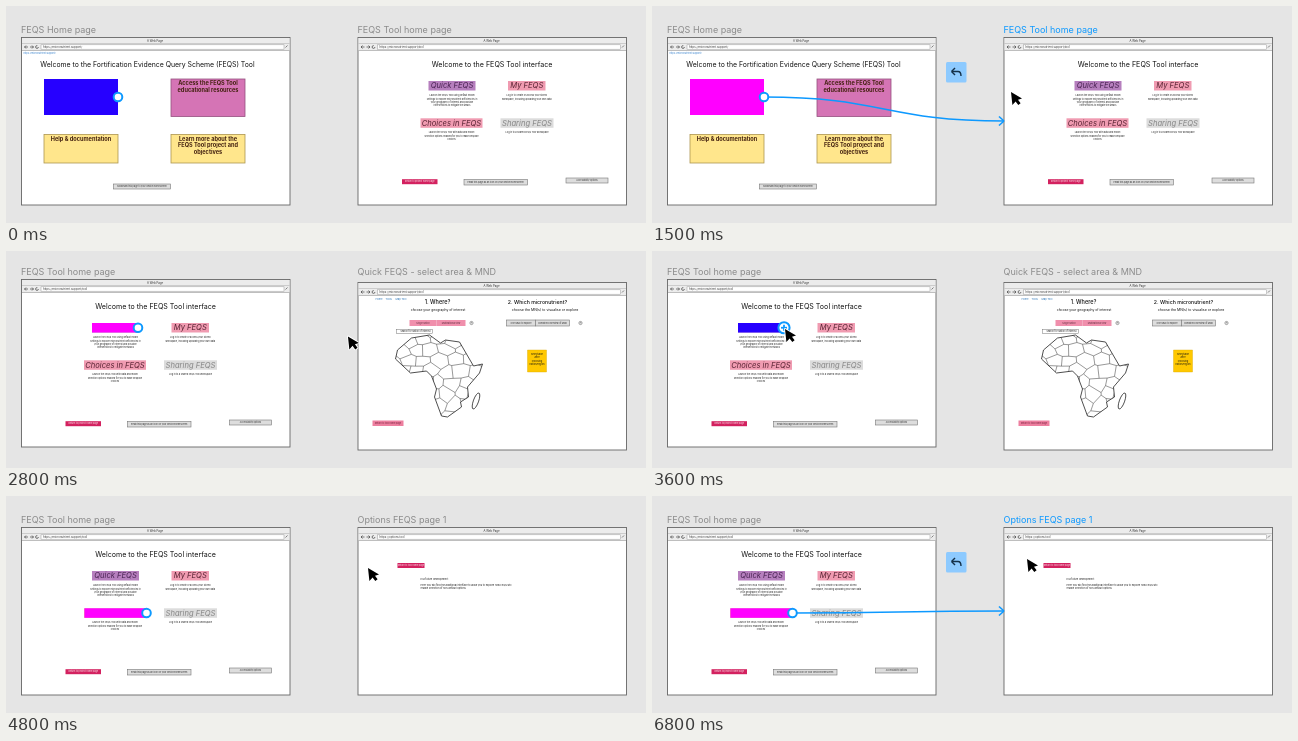
Animation, 640 px wide and 217 px high, one loop 6900 ms. Source, as an HTML page with a canvas:

```html
<!DOCTYPE html>
<html lang="en">
<head>
<meta charset="utf-8">
<title>Prototype linking</title>
<style>
html, body { margin: 0; width: 100%; height: 100%; overflow: hidden; background: #e5e5e5; }
canvas { display: block; width: 640px; height: 217px; }
</style>
</head>
<body>
<canvas id="stage"></canvas>
<script>
const LOOP = 6900;
const ACCENT = '#0d99ff', BLUE = '#2600ff', MAGENTA = '#ff00ff';
const FONT = 'Inter, "Open Sans", sans-serif';
const canvas = document.getElementById('stage');
const ratio = window.devicePixelRatio || 1;
canvas.width = 640 * ratio;
canvas.height = 217 * ratio;
const ctx = canvas.getContext('2d');

function text(str, x, y, size, { color = '#111', align = 'center', style = '' } = {}) {
  ctx.font = `${style} ${size}px ${FONT}`;
  ctx.fillStyle = color;
  ctx.textAlign = align;
  ctx.textBaseline = 'middle';
  ctx.fillText(str, x, y);
}

function lines(list, x, y, size, step, options) {
  list.forEach((str, i) => text(str, x, y + i * step, size, options));
}

function box(x, y, w, h, fill, edge, width = 0.6) {
  ctx.fillStyle = fill;
  ctx.fillRect(x, y, w, h);
  if (!edge) return;
  ctx.strokeStyle = edge;
  ctx.lineWidth = width;
  ctx.strokeRect(x, y, w, h);
}

function pill(label, x, y, w, h = 5.5, fill = '#ddd', color = '#222') {
  box(x, y, w, h, fill, fill === '#ddd' ? '#777' : null);
  text(label, x + w / 2, y + h / 2, 2.2, { color });
}

function path(points, close) {
  ctx.beginPath();
  for (let i = 0; i < points.length; i += 2) ctx.lineTo(points[i], points[i + 1]);
  if (close) ctx.closePath();
}

function stroke(color, width) {
  ctx.strokeStyle = color;
  ctx.lineWidth = width;
  ctx.stroke();
}

function segment(x0, y0, x1, y1, color, width) {
  ctx.beginPath();
  ctx.moveTo(x0, y0);
  ctx.lineTo(x1, y1);
  stroke(color, width);
}

function navArrow(x, dir) {
  segment(x, 10, x - dir * 3.5, 10, '#444', 0.7);
  segment(x, 10, x - dir * 1.5, 8.5, '#444', 0.7);
  segment(x, 10, x - dir * 1.5, 11.5, '#444', 0.7);
}

// Browser window; content is drawn relative to its top left corner.
function page(x, y, url, content) {
  ctx.save();
  ctx.translate(x, y);
  box(0.5, 0.5, 268.5, 167.5, '#fff', '#666', 0.9);
  box(1, 1, 267.5, 12.5, '#ececec');
  segment(1, 6.5, 268.5, 6.5, '#aaa', 0.5);
  segment(1, 13.5, 268.5, 13.5, '#999', 0.6);
  text('A Web Page', 134, 3.8, 2.8, { color: '#333' });
  navArrow(3.5, -1);
  navArrow(12.5, 1);
  ctx.beginPath();
  ctx.arc(16, 10, 1.4, 0, 5);
  stroke('#444', 0.7);
  box(20, 7.8, 243, 4.4, '#fff', '#999', 0.5);
  text(url, 22, 10.1, 2.8, { align: 'left', color: '#333' });
  segment(264.5, 10.5, 266.5, 8.5, '#555', 0.7);
  content();
  ctx.restore();
}

function homePage() {
  text('https://micronutrient.support/', 2.5, 16.2, 2.3, { align: 'left', color: '#2878c8' });
  text('Welcome to the Fortification Evidence Query Scheme (FEQS) Tool', 126.5, 27.5, 6.9);
  const card = (x, y, h, fill, edge, label) => {
    box(x, y, 74, h, fill, edge, 0.8);
    lines(label, x + 37, y + 4.7, 5.6, 6.5, { style: 'bold', color: '#43200f' });
  };
  card(150, 42, 37.5, '#d574b5', '#95527f', ['Access the FEQS Tool', 'educational resources']);
  card(23, 97.5, 28.5, '#ffe68c', '#ad9650', ['Help & documentation']);
  card(150, 97.5, 28.5, '#ffe68c', '#ad9650',
    ['Learn more about the', 'FEQS Tool project and', 'objectives']);
  pill('Bookmark this page to your device/homescreen', 92.5, 147, 57, 5);
}

function toolPage() {
  text('Welcome to the FEQS Tool interface', 134.5, 27.5, 7.1);
  const item = (label, x, y, w, fill, color, notes) => {
    box(x, y, w, 9.5, fill);
    text(label, x + w / 2, y + 5, 7.6, { style: 'italic', color });
    lines(notes, x + w / 2, y + 14.5, 2.25, 3.4);
  };
  item('Quick FEQS', 71, 44, 47, '#b67fbe', '#4b2454', [
    'Launch the FEQS Tool using default model',
    'settings to explore micronutrient deficiencies in',
    'your geography of interest and possible',
    'interventions to mitigate the MNDs']);
  item('My FEQS', 150.5, 44, 37.5, '#f09bb1', '#592333', [
    'Log in to create or access your stored',
    'workspace, including uploading your own data']);
  item('Choices in FEQS', 63, 81.3, 62, '#f09bb1', '#592333', [
    'Launch the FEQS Tool with data and model',
    'selection options enabled for you to make bespoke',
    'choices']);
  item('Sharing FEQS', 143, 81.3, 53, '#dcdcdc', '#858585', [
    'Log in to a shared FEQS Tool workspace']);
  pill('Return to project home page', 44.5, 142.2, 35.5, 5, '#d3215f', '#fff');
  pill('Email this page as an icon on your device/homescreen', 106.5, 142.5, 63.5, 5.5);
  pill('Accessibility options', 208.5, 141, 42, 5);
}

const COAST = [54, 56, 72, 53, 83, 61, 88, 58, 102, 60, 116, 84, 125, 82, 122, 91, 110, 105,
  111, 115, 103, 120, 104, 125, 90, 135, 84, 134, 77, 115, 79, 107, 74, 94, 69, 89, 53, 91,
  38, 77, 40, 68];

// Country borders: a jittered brick lattice clipped to the coastline.
function drawMap() {
  const wobble = n => {
    const s = Math.sin(n * 12.9898) * 43758.5453;
    return (s - Math.floor(s) - 0.5) * 6;
  };
  const node = (col, row) => [36 + col * 7.5 + wobble(col * 17 + row),
    50 + row * 11 + (col + row) % 2 * 3 + wobble(col + row * 23 + 5)];
  ctx.save();
  path(COAST, true);
  ctx.clip();
  for (let row = 0; row < 9; row++) {
    for (let col = 0; col < 13; col++) {
      const here = node(col, row);
      segment(...here, ...node(col + 1, row), '#444', 0.55);
      if ((col + row) % 2) segment(...here, ...node(col, row + 1), '#444', 0.55);
    }
  }
  ctx.restore();
  ctx.lineJoin = 'round';
  path(COAST, true);
  stroke('#222', 0.8);
  ctx.beginPath();
  ctx.ellipse(118.5, 119, 2.6, 8.5, 0.35, 0, 7);
  stroke('#222', 0.8);
}

function areaPage() {
  const link = { align: 'left', color: '#236fb5' };
  ['Home', 'Tools', 'Map Tool'].forEach((label, i) => text(label, 18 + i * 10, 16.8, 2.5, link));
  text('1. Where?', 80, 20, 5.5, { style: '500' });
  text('choose your geography of interest', 80.5, 27.5, 3.35);
  text('2. Which micronutrient?', 180, 20, 5.2, { style: '500' });
  text('choose the MN(s) to visualise or explore', 187.5, 27.5, 3.5);
  pill('Single nation', 52, 38, 27, 6, '#f08fac', '#57283a');
  pill('Multinational view', 79, 38, 29, 6, '#f08fac', '#57283a');
  pill('One MND to explore', 149, 38, 29, 6);
  pill('Combined overview of MND', 178, 38, 34, 6);
  for (const x of [114, 223]) {
    ctx.beginPath();
    ctx.arc(x, 41, 1.6, 0, 7);
    stroke('#444', 0.5);
    text('?', x, 41.2, 2.4);
  }
  box(39, 47.5, 36, 4, '#fff', '#777', 0.5);
  text('search for nation of interest', 58, 49.7, 2.3);
  drawMap();
  box(170, 68, 19, 22, '#ffc800', '#d9a900', 0.4);
  lines(['Selectable', 'after', 'choosing', 'nation/region'], 179.5, 72, 2.4, 3.4);
  pill('Return to tool home page', 15, 138.5, 31, 5.5, '#ed7f9f', '#6e1836');
}

function optionsPage() {
  pill('Return to tool home page', 40, 36, 27, 5, '#d3215f', '#fff');
  lines(['In a future development:', '',
    'Here you will find the additional interface to allow you to explore how FEQS will',
    'enable selection of non-default options'], 63, 52, 2.45, 3.2, { align: 'left' });
}

const TOOL_URL = 'https://micronutrient.support/tool';
const TOOL_TITLE = 'FEQS Tool home page';

// A scene's cursor rests, travels to the hotspot handle, then drags a link to the right page.
const scenes = [
  {
    start: 0, top: 31, titleY: 24, titles: ['FEQS Home page', TOOL_TITLE],
    urls: ['https://micronutrient.support/', TOOL_URL], pages: [homePage, toolPage],
    spot: { x: 38, y: 73, w: 74, h: 36 }, blueFrom: 0, hover: 650, snap: 1250, select: true,
    from: { x: 190, y: 192 }, grab: { x: 112, y: 90 }, to: { x: 359, y: 86 },
    appear: 100, go: 100, arrive: 650, drag: 900, drop: 1350
  },
  {
    start: 1700, top: 28, titleY: 21.5, titles: [TOOL_TITLE, 'Quick FEQS - select area & MND'],
    urls: [TOOL_URL, TOOL_URL], pages: [toolPage, areaPage],
    spot: { x: 86, y: 72, w: 46, h: 9.5 }, blueFrom: 3200, hover: 3250, snap: 4050,
    from: { x: 359, y: 86 }, grab: { x: 133, y: 78 }, to: { x: 362, y: 72 },
    appear: 1700, go: 2700, arrive: 3300, drag: 3700, drop: 4150
  },
  {
    start: 4400, top: 31, titleY: 24, titles: [TOOL_TITLE, 'Options FEQS page 1'],
    urls: [TOOL_URL, 'https://options.tool'], pages: [toolPage, optionsPage],
    spot: { x: 78.5, y: 112.3, w: 62, h: 9.5 }, blueFrom: 5750, hover: 5800, snap: 6550,
    from: { x: 362, y: 72 }, grab: { x: 143, y: 116 }, to: { x: 375, y: 63 },
    appear: 4400, go: 5200, arrive: 5850, drag: 6150, drop: 6650
  }
];

function progress(t, a, b) {
  const p = Math.min(1, Math.max(0, (t - a) / (b - a)));
  return p * p * (3 - 2 * p);
}

function cursorAt({ from, grab, to, appear, go, arrive, drag, drop }, t) {
  if (t < appear) return null;
  const p = progress(t, go, arrive), q = progress(t, drag, drop);
  const along = axis => from[axis] + (grab[axis] - from[axis]) * p + (to[axis] - grab[axis]) * q;
  return { x: along('x'), y: along('y') };
}

function drawCursor({ x, y }) {
  ctx.save();
  ctx.translate(x, y);
  path([0, 0, 1.4, 13, 4.6, 9.4, 7.3, 13, 9.6, 11.3, 7, 7.8, 11, 6.6], true);
  ctx.lineJoin = 'round';
  stroke('#fff', 1.8);
  ctx.fillStyle = '#000';
  ctx.fill();
  ctx.restore();
}

function drawHandle(x, y, plus) {
  ctx.beginPath();
  ctx.arc(x, y, plus ? 5.6 : 4.3, 0, 7);
  ctx.fillStyle = '#fff';
  ctx.fill();
  stroke(ACCENT, 2);
  if (!plus) return;
  segment(x - 3, y, x + 3, y, ACCENT, 1.8);
  segment(x, y - 3, x, y + 3, ACCENT, 1.8);
}

function drawLink(x0, y0, x1, y1) {
  const bend = (x1 - x0) / 2;
  ctx.beginPath();
  ctx.moveTo(x0, y0);
  ctx.bezierCurveTo(x0 + bend, y0, x1 - bend, y1, x1, y1);
  stroke(ACCENT, 1.6);
  segment(x1 - 5, y1 - 4.5, x1, y1, ACCENT, 1.6);
  segment(x1 - 5, y1 + 4.5, x1, y1, ACCENT, 1.6);
}

function drawSelection({ x, y, w, h }) {
  ctx.setLineDash([2, 1.5]);
  segment(x + w / 2, 31, x + w / 2, y, ACCENT, 0.8);
  segment(15, y + h / 2, x, y + h / 2, ACCENT, 0.8);
  ctx.setLineDash([]);
  ctx.strokeStyle = ACCENT;
  ctx.lineWidth = 1.5;
  ctx.strokeRect(x, y, w, h);
  for (const cx of [x, x + w]) {
    for (const cy of [y, y + h]) box(cx - 2.3, cy - 2.3, 4.6, 4.6, '#fff', ACCENT, 1.3);
  }
  ctx.beginPath();
  ctx.roundRect(50, 115, 51, 14.5, 2);
  ctx.fillStyle = ACCENT;
  ctx.fill();
  text('395 × 192', 75.5, 122.5, 9.2, { color: '#fff' });
}

function drawBackBadge() {
  const ink = '#14314a';
  ctx.beginPath();
  ctx.roundRect(294, 56, 20.5, 20.5, 1.5);
  ctx.fillStyle = '#8dcaff';
  ctx.fill();
  segment(303, 62, 299.5, 65.5, ink, 1.4);
  segment(299.5, 65.5, 303, 69, ink, 1.4);
  ctx.beginPath();
  ctx.moveTo(300, 65.5);
  ctx.lineTo(306, 65.5);
  ctx.quadraticCurveTo(309, 65.5, 309, 70);
  stroke(ink, 1.4);
}

function draw(t) {
  const scene = scenes.filter(s => s.start <= t).pop();
  const { x, y, w, h } = scene.spot;
  const cursor = cursorAt(scene, t);
  const dragging = t > scene.drag, snapped = t >= scene.snap;

  ctx.setTransform(ratio, 0, 0, ratio, 0, 0);
  box(0, 0, 640, 217, '#e5e5e5');
  scene.titles.forEach((title, i) => text(title, i ? 351.5 : 15, scene.titleY, 9,
    { align: 'left', color: i && snapped ? ACCENT : '#8b8b8b' }));
  page(15, scene.top, scene.urls[0], scene.pages[0]);
  page(351.5, 31, scene.urls[1], scene.pages[1]);

  box(x, y, w, h, t >= scene.blueFrom && !snapped ? BLUE : MAGENTA);
  if (scene.select && t >= scene.hover && !dragging) drawSelection(scene.spot);
  const hx = x + w, hy = y + h / 2;
  if (snapped) {
    drawLink(hx, hy, 352, 115);
    drawBackBadge();
  } else if (dragging) {
    drawLink(hx, hy, cursor.x, cursor.y);
  }
  drawHandle(hx, hy, t >= scene.hover && !dragging);
  if (cursor) drawCursor(cursor);
}

const begin = performance.now();
function tick() {
  draw((performance.now() - begin) % LOOP);
  requestAnimationFrame(tick);
}
tick();
</script>
</body>
</html>
```
